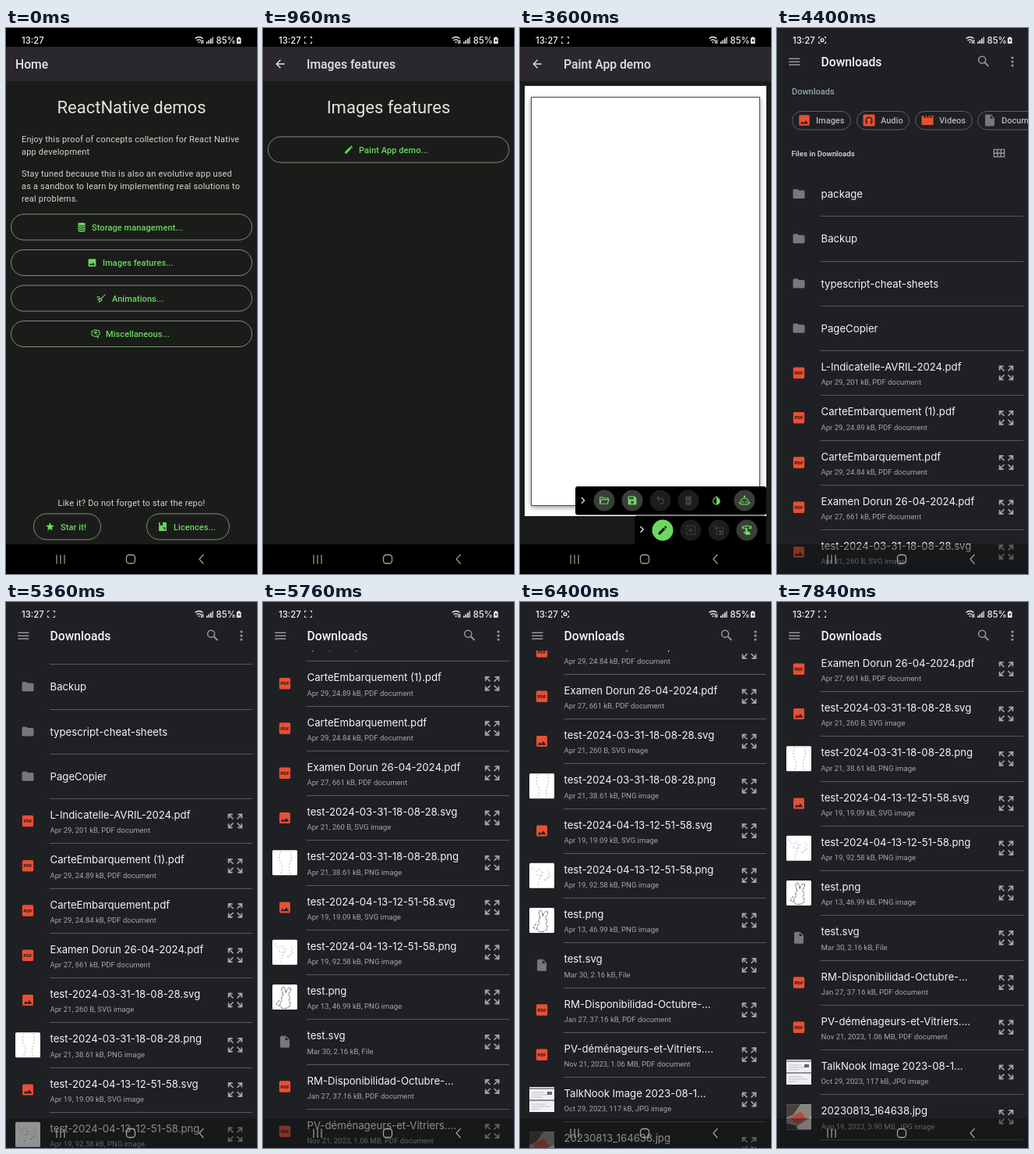
Write an HTML page that moves like this. It is 322 by 698 pixels and loops after 8 s.

```html
<!DOCTYPE html>
<html lang="en">
<head>
<meta charset="utf-8">
<title>App demo</title>
<style>
  html, body { margin: 0; width: 100%; height: 100%; overflow: hidden; background: #000; }
  svg { display: block; width: 100%; height: 100%; font-family: Roboto, sans-serif; }
  text { white-space: pre; }
  .line { fill: none; stroke: currentColor; stroke-width: 2; }
  .status, .file { font-family: Inter, sans-serif; }
</style>
</head>
<body>
<svg id="stage" viewBox="0 0 322 698"></svg>
<script>
const GREEN = '#6bd85f', RED = '#e94f35', DARK = '#1a1c19', PICKER = '#1f2023', GREY = '#97989c';
const ROW = 57.25;

const line = (d, extra = '') => `<path class="line" d="${d}" ${extra}/>`;
const fill = d => `<path fill-rule="evenodd" d="${d}"/>`;
const rect = (x, y, w, h, color, extra = '') =>
  `<rect x="${x}" y="${y}" width="${w}" height="${h}" fill="${color}" ${extra}/>`;
const text = (x, y, size, str, color, extra = '') =>
  `<text x="${x}" y="${y}" font-size="${size}" fill="${color}" ${extra}>${str}</text>`;
const medium = 'font-weight="500"';

// Icons live in a 24 x 24 box.
const icons = {
  back: fill('M20 11H7.8l5.6-5.6L12 4l-8 8 8 8 1.4-1.4L7.8 13H20z'),
  chevron: line('M8 5l7 7-7 7', 'style="stroke-width:2.6"'),
  database: '<ellipse cx="12" cy="5" rx="9" ry="3.5"/>' +
    [7.5, 12.5, 17.5].map(y => fill(`M3 ${y}c2 4 16 4 18 0v3c-2 4-16 4-18 0z`)).join(''),
  image: fill('M21 19V5a2 2 0 0 0-2-2H5a2 2 0 0 0-2 2v14a2 2 0 0 0 2 2h14a2 2 0 0 0 2-2zM8.5 13.5l2.5 3 3.5-4.5 4.5 6H5z'),
  motion: line('M22 3 11 14M2 9h7M3 14h4M9 12l5 4-6 5-1-5z'),
  brain: line('M8 4c-4 0-6 3-5 6-2 4 1 6 4 6 2 4 6 2 7 1l4 4v-5c4-1 5-5 3-8 0-4-4-5-6-4-2-2-5-2-7 0zM7 9h4v4M12 5v4h4M16 13h-3'),
  star: fill('M12 17.3 18.2 21l-1.7-7L22 9.2l-7.2-.6L12 2 9.2 8.6 2 9.2 7.5 14l-1.7 7z'),
  licence: fill('M3 2h3v8l3-2 3 2V2h9v20H3zM13 14v2h3v3h2v-5z'),
  folderOpen: line('M3 19V5h6l2 2h9v3M3 19l3-9h16l-3 9z'),
  save: fill('M17 3H5a2 2 0 0 0-2 2v14a2 2 0 0 0 2 2h14a2 2 0 0 0 2-2V7zM12 19a3 3 0 1 1 0-6 3 3 0 0 1 0 6zM15 9H5V5h10z'),
  undo: fill('M13.5 7a6.5 6.5 0 0 1 0 13H10v-2h3.5a4.5 4.5 0 0 0 0-9H7.8l3.1 3.1L9.5 13.5 4 8l5.5-5.5 1.4 1.4L7.8 7z'),
  trash: fill('M6 19a2 2 0 0 0 2 2h8a2 2 0 0 0 2-2V7H6zM19 4h-3.5l-1-1h-5l-1 1H5v2h14zM9 10l3 3 3-3 1 1-3 3 3 3-1 1-3-3-3 3-1-1 3-3-3-3z'),
  invert: fill('M17.7 7.9 12 2.3 6.3 7.9a8 8 0 1 0 11.4 0zM12 19.6a6 6 0 0 1-4.2-10.3L12 5.1z'),
  robot: line('M12 3v5M4 20v-5a7 7 0 0 1 16 0v5zM1 15v4M23 15v4') +
    '<circle cx="12" cy="3.5" r="2"/><circle cx="9" cy="15" r="1.7"/><circle cx="15" cy="15" r="1.7"/>',
  pencil: fill('M3 17.2V21h3.8L17.8 9.9l-3.7-3.7zM20.7 7a1 1 0 0 0 0-1.4l-2.3-2.3a1 1 0 0 0-1.4 0l-1.8 1.8 3.7 3.7z'),
  select: line('M3 3h18v18H3z', 'stroke-dasharray="3 2"') + line('M8 12h8M12 8v8'),
  resize: line('M2 2l7 7M9 4v5H4M12 7h9v14H7v-9', 'stroke-dasharray="5 1.5"') + line('M12 12l5 5M17 13v4h-4'),
  gesture: fill('M9 8a2 2 0 0 1 4 0v6l6 2v6h-9l-5-6 1-1 3 1z') + line('M3 8C6 1 18 1 21 8M3 3v5h5M21 3v5h-5'),
  folder: fill('M10 4H4a2 2 0 0 0-2 2v12a2 2 0 0 0 2 2h16a2 2 0 0 0 2-2V8a2 2 0 0 0-2-2h-8z'),
  doc: fill('M6 2a2 2 0 0 0-2 2v16a2 2 0 0 0 2 2h12a2 2 0 0 0 2-2V8l-6-6zM13 9V3.5L18.5 9z'),
  movie: fill('M18 4l2 4h-3l-2-4h-2l2 4h-3l-2-4H8l2 4H7L5 4H4a2 2 0 0 0-2 2v12a2 2 0 0 0 2 2h16a2 2 0 0 0 2-2V4z'),
  audio: rect(2, 2, 20, 20, 'currentColor', 'rx="2"') +
    `<g color="${PICKER}">${line('M7 16v-4a5 5 0 0 1 10 0v4M8 13v5M16 13v5')}</g>`,
  search: '<circle class="line" cx="9.5" cy="9.5" r="6"/>' + line('M14 14l6.5 6.5', 'style="stroke-width:2.6"'),
  grid: line('M2 5h20v14H2zM2 12h20M8.7 5v14M15.3 5v14'),
  expand: [0, 90, 180, 270].map(a =>
    `<g transform="rotate(${a} 12 12)">${line('M2 8V2h6M2 2l7 7')}${fill('M1 1h6L1 7z')}</g>`).join(''),
};
const icon = (name, cx, cy, size, color) =>
  `<g color="${color}" fill="currentColor" transform="translate(${cx - size / 2} ${cy - size / 2}) scale(${size / 24})">${icons[name]}</g>`;

const pill = (x, y, w, name, iconX, label, labelX) =>
  rect(x, y, w, 33, 'none', 'rx="16.5" stroke="#858b82"') +
  icon(name, iconX, y + 16.5, 13, GREEN) +
  text(labelX, y + 20.7, 11, label, GREEN, medium + ' letter-spacing=".08"');
const ripple = (id, x, y, w, h) => rect(x, y, w, h, '#9be58f', `id="${id}" rx="${h / 2}" opacity="0"`);
const header = (title, x = 56) =>
  rect(0, 24, 322, 636, DARK) + rect(0, 24, 322, 44, '#2a282d') +
  (x > 20 ? icon('back', 22, 46, 17, '#e6e1e5') : '') + text(x, 52, 15.7, title, '#e6e1e5', medium);
const headline = str => text(161, 109, 22, str, '#e2e3dd', 'text-anchor="middle"');

function homeScreen() {
  const body = [[146, 'Enjoy this proof of concepts collection for React Native'], [162, 'app development'],
    [190, 'Stay tuned because this is also an evolutive app used'],
    [206, 'as a sandbox to learn by implementing real solutions to'], [222, 'real problems.']];
  return header('Home', 12) + headline('ReactNative demos') +
    body.map(([y, s]) => text(20, y, 11, s, '#d3d5cf', 'letter-spacing=".2"')).join('') +
    ripple('pressHome', 6.5, 283.5, 309, 33) +
    pill(6.5, 238, 309, 'database', 97, 'Storage management...', 110) +
    pill(6.5, 283.5, 309, 'image', 110.5, 'Images features...', 124) +
    pill(6.5, 329, 309, 'motion', 122, 'Animations...', 136) +
    pill(6.5, 374.5, 309, 'brain', 115, 'Miscellaneous...', 128) +
    text(161, 611, 11, 'Like it? Do not forget to star the repo!', '#d3d5cf', 'text-anchor="middle" letter-spacing=".2"') +
    pill(35.5, 621, 86, 'star', 56.5, 'Star it!', 70) +
    pill(180.5, 621, 106, 'licence', 201, 'Licences...', 215);
}

const imagesScreen = () => header('Images features') + headline('Images features') +
  ripple('pressImages', 6.5, 139, 309, 33) + pill(6.5, 139, 309, 'pencil', 110, 'Paint App demo...', 123);

function paintScreen() {
  const tool = (name, x, y, bg, color) =>
    `<circle cx="${x}" cy="${y}" r="13.5" fill="${bg}"/>` + icon(name, x, y, 14.5, color);
  const on = ['#3b3d3b', GREEN], off = ['#1b1c1b', '#484a48'];
  return header('Paint App demo') + rect(6, 74, 310, 550, '#fff') +
    rect(14.5, 88.5, 293, 522, '#fff', 'stroke="#4c4c4c" style="filter:drop-shadow(0 2px 3px #0006)"') +
    rect(71, 586, 245, 36.5, '#000', 'rx="3"') + rect(147, 623.5, 169, 36.5, '#000', 'rx="3"') +
    icon('chevron', 81, 604, 13, '#ddd') + icon('chevron', 156.5, 641, 13, '#ddd') +
    tool('folderOpen', 108, 604, ...on) + tool('save', 144, 604, ...on) +
    tool('undo', 180, 604, ...off) + tool('trash', 216, 604, ...off) +
    tool('invert', 252, 604, '#000', GREEN) + tool('robot', 288, 604, ...on) +
    tool('pencil', 183, 642, GREEN, '#111') + tool('select', 219, 642, ...off) +
    tool('resize', 255, 642, ...off) + tool('gesture', 291, 642, ...on) +
    ripple('pressOpen', 94.5, 590.5, 27, 27);
}

const files = [
  ['package', '', 'folder'], ['Backup', '', 'folder'],
  ['typescript-cheat-sheets', '', 'folder'], ['PageCopier', '', 'folder'],
  ['L-Indicatelle-AVRIL-2024.pdf', 'Apr 29, 201 kB, PDF document', 'pdf'],
  ['CarteEmbarquement (1).pdf', 'Apr 29, 24.89 kB, PDF document', 'pdf'],
  ['CarteEmbarquement.pdf', 'Apr 29, 24.84 kB, PDF document', 'pdf'],
  ['Examen Dorun 26-04-2024.pdf', 'Apr 27, 661 kB, PDF document', 'pdf'],
  ['test-2024-03-31-18-08-28.svg', 'Apr 21, 260 B, SVG image', 'image'],
  ['test-2024-03-31-18-08-28.png', 'Apr 21, 38.61 kB, PNG image', 'waves'],
  ['test-2024-04-13-12-51-58.svg', 'Apr 19, 19.09 kB, SVG image', 'image'],
  ['test-2024-04-13-12-51-58.png', 'Apr 19, 92.58 kB, PNG image', 'flower'],
  ['test.png', 'Apr 13, 46.99 kB, PNG image', 'doodle'],
  ['test.svg', 'Mar 30, 2.16 kB, File', 'doc'],
  ['RM-Disponibilidad-Octubre-...', 'Jan 27, 37.16 kB, PDF document', 'pdf'],
  ['PV-déménageurs-et-Vitriers....', 'Nov 21, 2023, 1.06 MB, PDF document', 'pdf'],
  ['TalkNook Image 2023-08-1...', 'Oct 29, 2023, 117 kB, JPG image', 'scan'],
  ['20230813_164638.jpg', 'Aug 19, 2023, 3.90 MB, JPG image', 'photo'],
];

// Thumbnails are drawn in a 32 x 32 box.
const stroke = (d, color, extra = '') => `<path d="${d}" fill="none" stroke="${color}" ${extra}/>`;
const dashed = 'stroke-dasharray="2 2"';
const thumbs = {
  waves: stroke('M11 1q-4 8 0 15t-1 15M23 1q3 8 0 15t0 15', '#b5b09c', dashed),
  flower: stroke('M11 29q1-8 5-14M19 22l8-6', '#8fcf97', dashed) +
    stroke('M3 5q5 8 8 4t5 6M24 8q4 5-1 8', '#cba5ea', dashed) +
    stroke('M8 14l6 3 4-6M20 22l7-5', '#8ccbe4', dashed),
  doodle: stroke('M14 13q-4-9 0-10 3 1 3 8 3-8 6-7 2 3-3 9 5 4 1 7 5 7-2 10-7 2-9-2-1-5 3-8-3-4 1-7zM9 20l-4 5 4 3',
    '#444', 'stroke-width=".8" stroke-dasharray="4 1"'),
  scan: rect(0, 0, 32, 32, '#f1f0f4') + rect(0, 1, 32, 2, '#99959f') + rect(0, 16, 32, 2, '#8f8c9a') +
    stroke('M3 7h16M3 10h22M3 13h13M3 22h18M3 25h24M3 28h10', '#c0bfca') + rect(23, 6, 6, 4, '#66636f'),
  photo: rect(0, 0, 32, 32, '#8b8580') + `<path d="M0 0h18l-9 13-9 4z" fill="#49403c"/>` +
    `<path d="M4 17l14-8 8 9-12 7z" fill="#b8493c"/><path d="M17 26l15-10v16H10z" fill="#d5cec7"/><path d="M0 24l12 3 3 5H0z" fill="#35322f"/>`,
};

function fileMark(kind, y) {
  if (thumbs[kind])
    return `<g transform="translate(12 ${y - 16})">${rect(0, 0, 32, 32, '#fff', 'rx="1.5"')}${thumbs[kind]}</g>`;
  if (kind === 'pdf')
    return rect(20.8, y - 7.2, 14.4, 14.4, RED, 'rx="1.6"') +
      text(28, y + 2.2, 6, 'PDF', '#2a1512', 'text-anchor="middle" font-weight="700"');
  return icon(kind, 28, y, kind === 'image' ? 18.5 : 18, kind === 'image' ? RED : '#77787b');
}

function fileRow([name, detail, kind], i) {
  const y = 212 + ROW * i;
  return fileMark(kind, y) +
    text(56.5, detail ? y - 3 : y + 5, 13.2, name, '#f4f4f6', 'class="file"') +
    (detail ? text(56.5, y + 15.3, 9.55, detail, '#a5a6aa') + icon('expand', 294, y, 20, '#a4a5a9') : '') +
    rect(56, Math.round(y + 28.3), 260, 1, '#58595d');
}

const chip = (x, w, name, label, color = RED) =>
  rect(x + .5, 106.5, w, 23.5, 'none', 'rx="11.8" stroke="#5e6064"') +
  icon(name, x + 16, 118, 18, color) + text(x + 31, 122, 11, label, '#b4b6ba', medium);

const pickerScreen = () => rect(0, 0, 322, 698, PICKER) +
  `<g id="list">` +
  text(19, 85, 11, 'Downloads', '#93a6aa', medium) +
  chip(19, 75, 'image', 'Images') + chip(102, 67, 'audio', 'Audio') +
  chip(177, 73, 'movie', 'Videos') + chip(257, 96, 'doc', 'Documents', '#77787b') +
  text(18.5, 164, 9.7, 'Files in Downloads', '#dedee1', medium) + icon('grid', 285, 160, 16, GREY) +
  files.map(fileRow).join('') + `</g>` +
  rect(0, 0, 322, 62, PICKER) +
  `<g color="${GREY}">${line('M15.3 39.3h14M15.3 43.2h14M15.3 47.1h14', 'style="stroke-width:1.5"')}</g>` +
  text(56.5, 49.1, 15.7, 'Downloads', '#f4f4f6', medium) + icon('search', 265, 42.5, 18, GREY) +
  [38, 43, 48].map(y => `<circle cx="302" cy="${y}" r="1.6" fill="${GREY}"/>`).join('') +
  rect(0, 660, 322, 38, 'rgba(14,14,16,.45)');

const systemBars = () => `<g color="#f2f2f2" fill="currentColor">` +
  text(20, 19.7, 11.4, '13:27', '#f2f2f2', 'class="status" font-weight="500"') +
  `<g id="record">${line('M53.5 13.5v-2h2M60.5 11.5h2v2M62.5 17.5v2h-2M55.5 19.5h-2v-2', 'style="stroke-width:1"')}
   <circle id="dot" class="line" cx="58" cy="15.5" r="1.9" style="stroke-width:1.3"/></g>` +
  line('M242.5 13.5q5-4 10 0M244.5 16q3-2.4 6 0', 'style="stroke-width:1.3"') + fill('M246 17.5h3l-1.5 2zM250 16h1.2v4H250zM252 15h1.2v5H252z') +
  fill('M257 17.5h1.6V20H257zM259.5 15.5h1.6V20h-1.6zM262 13.5h1.6V20H262zM264.5 11.5h1.2V20h-1.2z') +
  text(269.5, 19.7, 11.4, '85%', '#f2f2f2', 'class="status" font-weight="500"') +
  fill('M297.4 11.4h2.6v1h1.5V20h-5.6v-7.6h1.5zM299.2 13.6l-2 3h1.4v2l2-3h-1.4z') + `</g>` +
  `<g color="#a3a3a3">` + line('M65 673.5v11.5M70 673.5v11.5M75 673.5v11.5M253.5 673l-5.5 6 5.5 6', 'style="stroke-width:1.2"') +
  `<rect class="line" x="154.5" y="673.5" width="11" height="11" rx="3.6" style="stroke-width:1.3"/></g>`;

const group = (id, content) => `<g id="${id}">${content}</g>`;
document.getElementById('stage').innerHTML =
  group('home', homeScreen()) + group('images', imagesScreen()) + group('paint', paintScreen()) +
  rect(0, 660, 322, 38, '#000') + group('picker', pickerScreen()) + systemBars();

const el = id => document.getElementById(id);
const clamp = v => Math.max(0, Math.min(1, v));
const bezier = (u, a, b, c, d) =>
  a * (1 - u) ** 3 + 3 * b * u * (1 - u) ** 2 + 3 * c * u * u * (1 - u) + d * u ** 3;

// Platform curve: fast start, very slow finish.
function easeOpen(p) {
  const early = p < 1 / 6;
  const xs = early ? [0, .05, .1333, 1 / 6] : [1 / 6, .2083, .25, 1];
  const ys = early ? [0, 0, .06, .4] : [.4, .82, 1, 1];
  let lo = 0, hi = 1;
  for (let i = 0; i < 24; i++) {
    const mid = (lo + hi) / 2;
    bezier(mid, ...xs) < p ? lo = mid : hi = mid;
  }
  return bezier(lo, ...ys);
}

function along(points, t) {
  if (t <= points[0][0]) return points[0][1];
  for (let i = 1; i < points.length; i++) {
    const [t0, v0] = points[i - 1], [t1, v1] = points[i];
    if (t < t1) return v0 + (v1 - v0) * (t - t0) / (t1 - t0);
  }
  return points[points.length - 1][1];
}

const LOOP = 8000, OPEN_TIME = 450;
const screens = [['home', -1000], ['images', 400], ['paint', 2030], ['picker', 3620]];
const presses = [['pressHome', 80], ['pressImages', 1520], ['pressOpen', 3160]];
const scroll = [[5140, 0], [5280, 90], [5440, 230], [5600, 330], [5760, 394], [6000, 440], [6400, 492], [6720, 527]];

function render(t) {
  screens.forEach(([id, start], i) => {
    const next = screens[i + 1] ? screens[i + 1][1] : Infinity;
    const x = 32 * (1 - easeOpen(clamp((t - start) / OPEN_TIME)) - easeOpen(clamp((t - next) / OPEN_TIME)));
    const node = el(id);
    node.setAttribute('transform', `translate(${x} 0)`);
    node.setAttribute('opacity', clamp((t - start - 50) / 83));
    node.style.display = t < start || t > next + OPEN_TIME ? 'none' : '';
  });
  for (const [id, start] of presses)
    el(id).setAttribute('opacity', along([[start, 0], [start + 90, .14], [start + 180, .14], [start + 340, 0]], t));
  el('list').setAttribute('transform', `translate(0 ${-Math.round(along(scroll, t))})`);
  el('list').setAttribute('opacity', clamp((t - 4110) / 200));
  el('record').style.display = t < 80 ? 'none' : '';
  el('dot').style.display = Math.floor((t + 205) / 1020) % 2 ? 'none' : '';
}

function frame(now) {
  render(now % LOOP);
  requestAnimationFrame(frame);
}
render(0);
requestAnimationFrame(frame);
</script>
</body>
</html>
```
